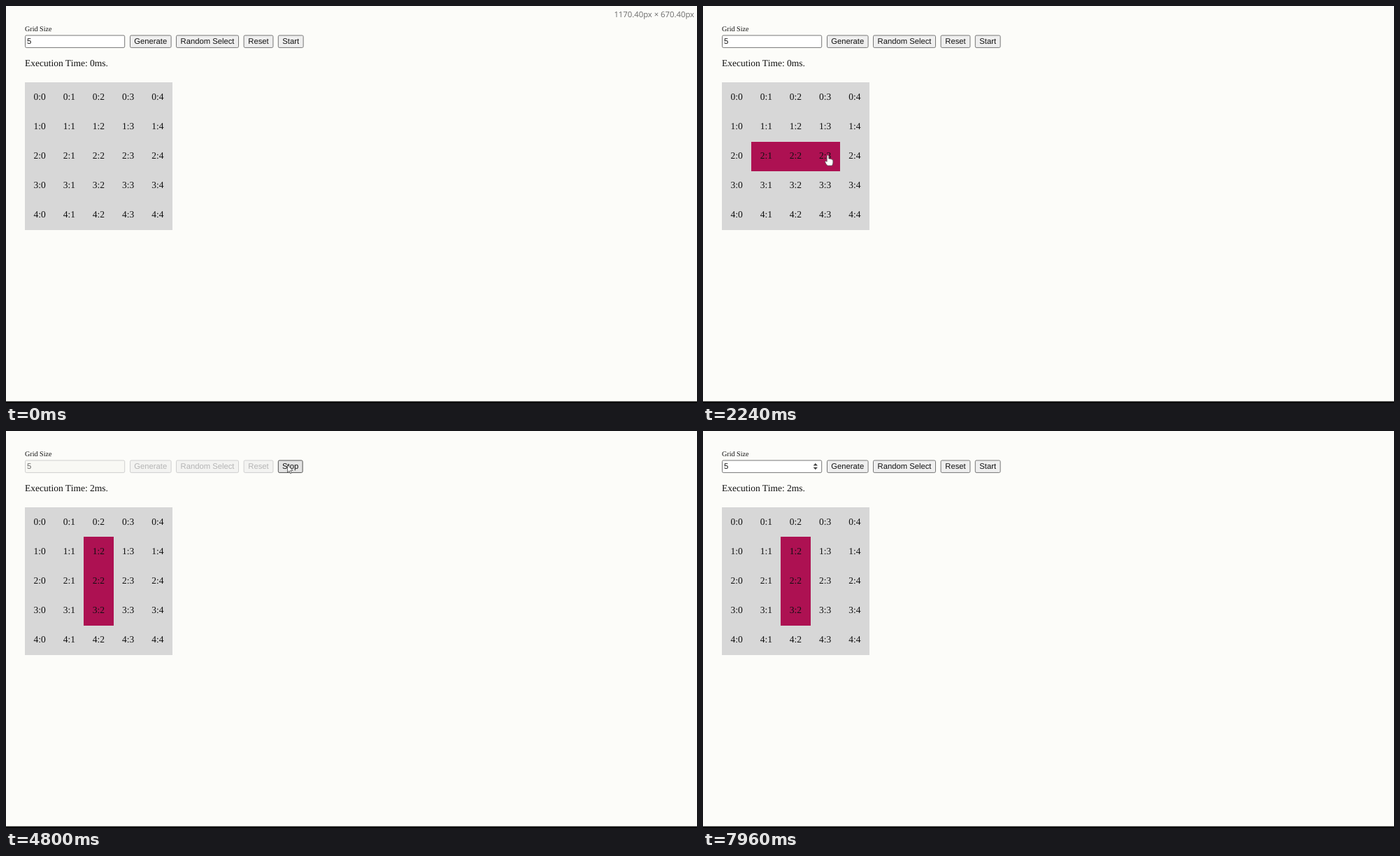
Animation of 988x567 px, one loop 8 s. Source, as an HTML page:

```html
<!DOCTYPE html>
<html lang="en">
<head>
<meta charset="utf-8">
<title>Grid automaton</title>
<style>
  html, body { margin: 0; width: 100%; height: 100%; overflow: hidden; background: #fcfcf9; }
  svg { display: block; width: 988px; height: 567px; }
  text { text-rendering: geometricPrecision; fill: #111; }
  .serif { font-family: "Liberation Serif", "Times New Roman", serif; font-size: 13.5px; }
  .sans { font-family: "Liberation Sans", Arial, sans-serif; font-size: 11.26px; }
  .mid { text-anchor: middle; }
  .crisp { shape-rendering: crispEdges; }
</style>
</head>
<body>
<svg id="stage" viewBox="0 0 988 567"></svg>
<script>
const LOOP = 8000;
const CELL = 42.2, ROW = 42.05, LEFT = 27, TOP = 109.4, SIZE = 5;
const stage = document.getElementById('stage');

function add(tag, attrs, parent = stage, content = '') {
  const el = document.createElementNS('http://www.w3.org/2000/svg', tag);
  set(el, attrs);
  el.textContent = content;
  parent.appendChild(el);
  return el;
}

function set(el, attrs) {
  for (const key in attrs) el.setAttribute(key, attrs[key]);
}

function show(el, on) {
  el.setAttribute('visibility', on ? 'visible' : 'hidden');
}

// Static page
add('rect', { y: 564.6, width: 988, height: 2.4, fill: '#0a0a0a' });
add('text', { x: LEFT, y: 35.7, class: 'serif', style: 'font-size:10.13px' }, stage, 'Grid Size');
const timing = add('text', { x: LEFT, y: 85.6, class: 'serif' });
const sizeLabel = add('text', {
  x: 984, y: 15.8, 'text-anchor': 'end',
  style: 'font:11.3px "Open Sans", sans-serif;fill:#6a6a6a'
}, stage, '1170.40px × 670.40px');

// Form controls
function control(x, width, label) {
  const box = add('rect', { x: x + .5, y: 42, width: width - 1, height: 17.4, rx: 1.7 });
  const text = add('text', { y: 54, class: 'sans' }, stage, label);
  return { x, width, box, text };
}

const input = control(27, 143.2, '5');
set(input.text, { x: 30 });
const spinner = add('path', { d: 'M157.6 49.4l3.2-3.4 3.2 3.4zM157.6 51.8l3.2 3.4 3.2-3.4z', fill: '#444' });
const buttons = [
  control(177, 59.6, 'Generate'),
  control(243, 90, 'Random Select'),
  control(339.6, 42.8, 'Reset'),
  control(388.8, 36.8, 'Start')
];
const toggle = buttons[3];
for (const b of buttons) set(b.text, { x: b.x + b.width / 2, class: 'sans mid' });

// Grid
add('rect', {
  x: LEFT, y: TOP, width: CELL * SIZE, height: ROW * SIZE, fill: '#d7d7d7', class: 'crisp'
});
const live = add('rect', { fill: '#ad1152', class: 'crisp' });
for (let r = 0; r < SIZE; r++) {
  for (let c = 0; c < SIZE; c++) {
    add('text', {
      x: LEFT + CELL * (c + .5), y: TOP + ROW * (r + .5) + 3.5, class: 'serif mid'
    }, stage, r + ':' + c);
  }
}
const selection = add('g', {});
add('rect', { x: 88, y: 207, width: 4.4, height: 15, fill: '#2746bd' }, selection);
add('text', { x: 90.3, y: 218, class: 'serif mid', style: 'fill:#fff' }, selection, ':');

// Pointers, both with the hot spot at 0,0
const arrow = add('path', {
  d: 'M0 0V10.6L2.5 8.3 4.2 12.2 5.9 11.4 4.2 7.7H7.5Z',
  fill: '#fff', stroke: '#444', 'stroke-width': .8
});
const hand = add('path', {
  d: 'M-1.3 1Q0-.8 1.3 1V5.2Q2.6 4.5 3.6 5.6 4.8 5 5.6 6.2 7.4 5.8 7.4 8V11' +
     'Q7.2 13 6 15H-.4Q-1.4 13.8-2.6 12.5L-4 9.8Q-3.4 7.6-1.3 9.3Z',
  fill: '#fff', stroke: '#555', 'stroke-width': .8
});

// Pointer path: time, x, y
const path = [
  [480, 215, 347], [960, 75, 266], [1160, 74, 264], [1360, 89, 213], [1440, 91, 212.5],
  [1520, 138, 212.5], [1720, 139, 212.5], [1920, 178.5, 213], [2320, 178.5, 213],
  [2800, 394, 72], [3040, 401, 48], [3560, 401, 46], [3920, 402, 48], [4440, 402, 48],
  [5720, 404.5, 51], [6160, 406, 50], [6680, 406, 50], [7080, 242, 55],
  [7320, 240, 55], [7640, 160, 52], [7960, 110, 51]
];

function pointerAt(t) {
  if (t < path[0][0]) return null;
  const i = path.findIndex(p => p[0] > t);
  if (i < 0) return path[path.length - 1].slice(1);
  const [t0, x0, y0] = path[i - 1], [t1, x1, y1] = path[i];
  let k = (t - t0) / (t1 - t0);
  k = k * k * (3 - 2 * k);
  return [x0 + (x1 - x0) * k, y0 + (y1 - y0) * k];
}

// Live cells as column, row, columns, rows
function liveCells(t) {
  if (t < 1400) return [1, 2, 0, 0];
  if (t < 1720) return [1, 2, 1, 1];
  if (t < 2040) return [1, 2, 2, 1];
  const vertical = (t >= 4440 && t < 5300) || t >= 6160;
  return vertical ? [2, 1, 1, 3] : [1, 2, 3, 1];
}

function paintControl(c, off, hover, isInput) {
  const active = hover && !isInput;
  const fill = isInput ? (off ? '#f8f8f4' : '#fff') : off ? '#f3f3f1' : active ? '#e4e4e4' : '#efefef';
  set(c.box, { fill, stroke: off ? '#cfcfcf' : active ? '#505050' : '#767676' });
  c.text.style.fill = off ? (isInput ? '#666' : '#b4b4b4') : '#111';
}

function render(t) {
  const pos = pointerAt(t);
  const running = t >= 3320 && t < 6640;
  const inBar = pos && pos[1] > 41 && pos[1] < 60;
  const over = c => inBar && pos[0] > c.x - 1.5 && pos[0] < c.x + c.width;

  show(sizeLabel, t < 720);
  timing.textContent = `Execution Time: ${t < 4440 ? 0 : 2}ms.`;

  toggle.text.textContent = running ? 'Stop' : 'Start';
  toggle.width = running ? 35.8 : 36.8;
  set(toggle.box, { width: toggle.width - 1 });
  set(toggle.text, { x: toggle.x + toggle.width / 2 });
  for (const b of buttons) paintControl(b, running && b !== toggle, over(b), false);
  paintControl(input, running, over(input), true);
  show(spinner, over(input) && !running);

  const [c, r, w, h] = liveCells(t);
  set(live, { x: LEFT + c * CELL, y: TOP + r * ROW, width: w * CELL, height: h * ROW });
  show(selection, t >= 1400 && t < 1720);

  const inGrid = pos && pos[0] > LEFT && pos[0] < LEFT + CELL * SIZE &&
    pos[1] > TOP && pos[1] < TOP + ROW * SIZE;
  show(hand, inGrid);
  show(arrow, pos && !inGrid && !over(input));
  if (pos) for (const el of [hand, arrow]) set(el, { transform: `translate(${pos})` });
}

const start = performance.now();
function tick() {
  render((performance.now() - start) % LOOP);
  requestAnimationFrame(tick);
}
render(0);
requestAnimationFrame(tick);
</script>
</body>
</html>
```
